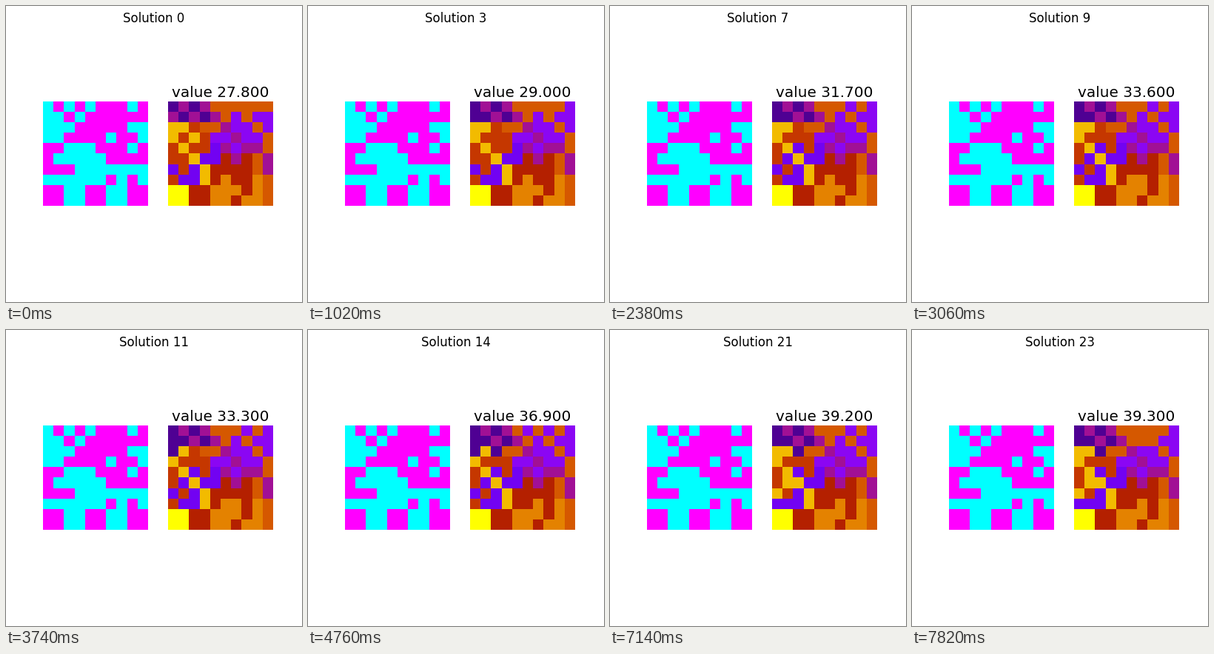
A matplotlib script for the animation above (8000 ms loop, 400x400 px).

```python
import numpy as np
import matplotlib.pyplot as plt
from matplotlib.animation import FuncAnimation

SIZE, CELLS = 400, 10
STEP_MS, LOOP_MS, TICK_MS = 340, 8000, 40

(INDIGO, BLUE, VIOLET, PURPLE, RED,
 RUST, ORANGE, AMBER, GOLD, YELLOW) = range(1, 11)

# One cell changes hands per step: step -> (row, column, new district).
MOVES = {
    1: (1, 0, INDIGO), 2: (0, 9, VIOLET), 3: (3, 2, RUST),
    4: (0, 7, VIOLET), 6: (4, 2, BLUE), 7: (5, 1, BLUE),
    8: (7, 6, AMBER), 10: (2, 0, INDIGO), 12: (7, 5, RED),
    13: (2, 2, INDIGO), 14: (0, 5, VIOLET), 15: (0, 5, ORANGE),
    16: (7, 0, BLUE), 19: (5, 1, GOLD), 20: (2, 0, GOLD),
    21: (6, 0, GOLD), 22: (1, 6, ORANGE), 23: (0, 7, ORANGE),
}


def value_at(step):
    key_steps = [0, 5, 9, 11, 14, 18, 23]
    key_values = [27.8, 29.8, 33.6, 33.3, 36.9, 39.1, 39.3]
    return round(np.interp(step, key_steps, key_values), 1)


def checker(grid, rows, cols, even, odd):
    row, col = np.indices(grid.shape)
    pattern = np.where((row + col) % 2, odd, even)
    grid[rows, cols] = pattern[rows, cols]


def voter_grid():
    grid = np.ones((CELLS, CELLS), int)
    grid[:4, :2] = 0
    checker(grid, slice(0, 1), slice(0, 5), 0, 1)
    checker(grid, slice(7, 8), slice(5, 10), 1, 0)
    grid[7, 5:] = 1 - grid[7, 5:]
    grid[7, :6] = 0
    grid[0, 8] = grid[1, 3] = grid[2, 2] = 0
    grid[2, 8:] = grid[3, 6::3] = 0
    grid[4, 2:5] = grid[4, 8] = 0
    grid[5, 1:6] = grid[6, 3:] = 0
    grid[8:] = 1 - np.arange(CELLS) // 2 % 2
    return grid


def first_districts():
    grid = np.full((CELLS, CELLS), ORANGE)

    # Top: interleaved districts.
    checker(grid, slice(0, 2), slice(0, 5), INDIGO, PURPLE)
    grid[0, 4] = ORANGE
    checker(grid, slice(1, 3), slice(6, 10), ORANGE, VIOLET)
    checker(grid, slice(2, 5), slice(5, 8), VIOLET, PURPLE)
    grid[1, 9] = grid[2, 7] = grid[3, 4] = grid[3, 8] = VIOLET
    grid[4, 8] = PURPLE
    grid[5:7, 9] = PURPLE

    # Left side.
    grid[2, :2] = GOLD
    grid[2, 2] = RUST
    checker(grid, slice(3, 5), slice(0, 4), RUST, GOLD)
    grid[4, 3] = RUST
    grid[5:8, :2] = RUST
    grid[5, 2] = grid[6, 3] = grid[7, 3] = GOLD
    grid[6, 0:3:2] = grid[7, 1:3] = BLUE

    # Bottom.
    grid[5:8, 4:8] = RED
    grid[5, 6] = PURPLE
    grid[5, 3:5] = grid[4, 4] = BLUE
    grid[8:, :2] = YELLOW
    grid[8:, 2:4] = RED
    grid[8:, 4:9] = AMBER
    grid[7, 5::3] = AMBER
    grid[8, 7] = grid[9, 6] = RED
    return grid


def districts_at(step):
    grid = first_districts()
    for when, (row, col, district) in MOVES.items():
        if when <= step:
            grid[row, col] = district
    return grid


def show_grid(left, grid, cmap, vmax):
    # Just under 142 by 141 pixels, which the renderer rounds up.
    ax = fig.add_axes([left / SIZE, 130 / SIZE, 141.9 / SIZE, 140.9 / SIZE])
    ax.axis("off")
    return ax.imshow(grid, cmap=cmap, vmin=0, vmax=vmax,
                     interpolation="nearest", aspect="auto")


plt.rcParams["font.family"] = "DejaVu Sans"
fig = plt.figure(figsize=(4, 4), dpi=100, facecolor="white")

show_grid(50, voter_grid(), "cool", 1)
district_map = show_grid(219, first_districts(), "gnuplot", 10)
heading = fig.text(0.5, 0.98, "", fontsize=12, ha="center", va="top")
value_label = fig.text(289.5 / SIZE, 1 - 122.6 / SIZE, "", fontsize=14.4,
                       ha="center", va="baseline")


def update(tick):
    # Sampling mid-tick keeps the picture right at every step boundary.
    step = (tick * TICK_MS + TICK_MS // 2) // STEP_MS
    district_map.set_data(districts_at(step))
    heading.set_text(f"Solution {step}")
    value_label.set_text(f"value {value_at(step):.3f}")
    return district_map, heading, value_label


anim = FuncAnimation(fig, update, frames=LOOP_MS // TICK_MS,
                     interval=TICK_MS, repeat=True, repeat_delay=0)
plt.show()
```
